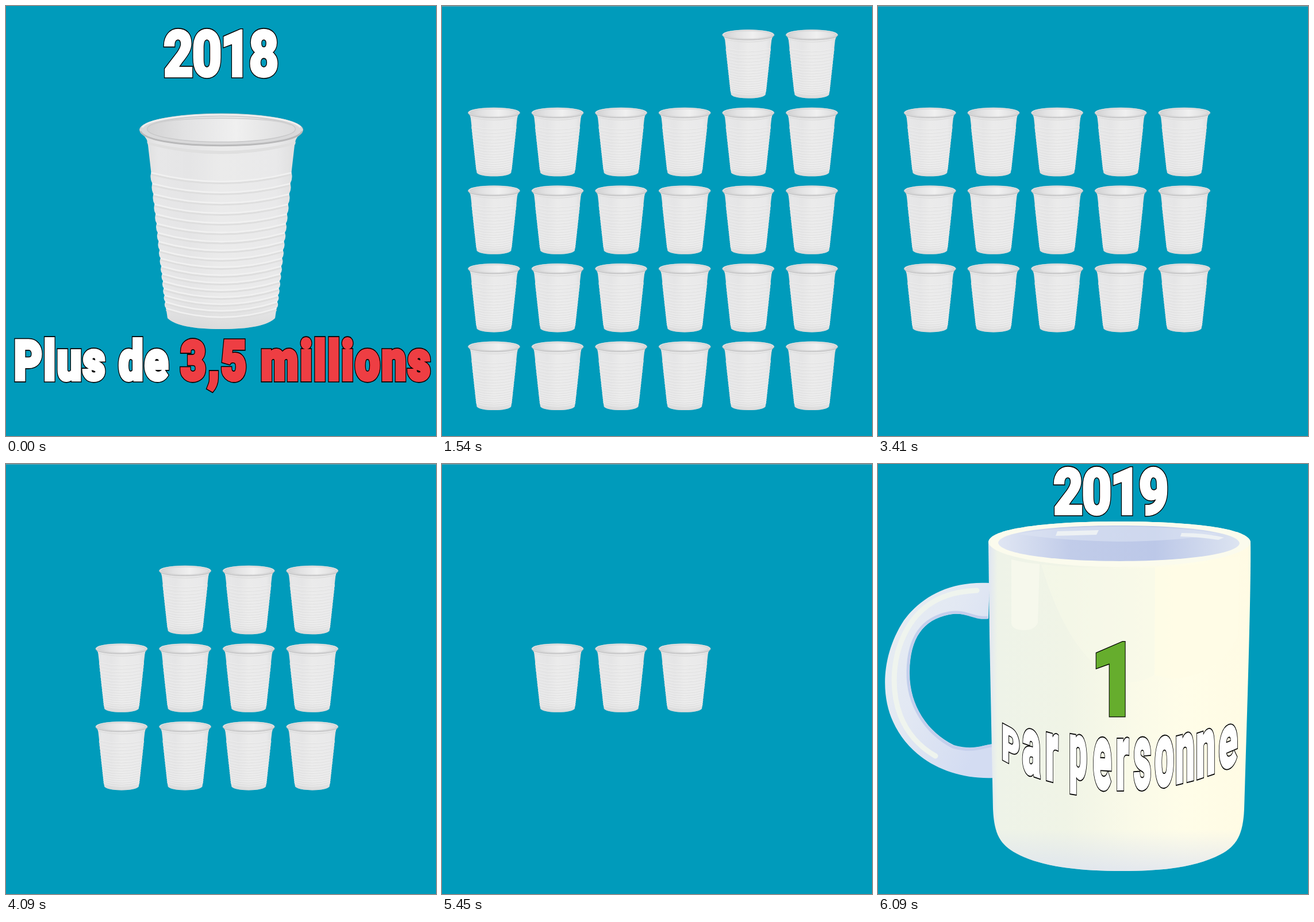
Write an HTML page that moves like this. It is 748 px wide and 748 px high and loops after 8000 ms.

```html
<!DOCTYPE html>
<html lang="fr">
<head>
<meta charset="utf-8">
<title>Gobelets</title>
<style>
  html, body { margin: 0; width: 100%; height: 100%; overflow: hidden; background: #009bbb; }
  svg { display: block; width: 100vw; height: 100vh; }
  text {
    font-family: Roboto, "Open Sans", sans-serif;
    font-weight: 900;
    stroke-linejoin: miter;
    stroke-miterlimit: 2;
    paint-order: stroke;
    vector-effect: non-scaling-stroke;
  }
  #grid, #mug { visibility: hidden; }
</style>
</head>
<body>
<svg viewBox="0 0 748 748">
  <defs>
    <linearGradient id="cupSide">
      <stop offset="0" stop-color="#dedede"/>
      <stop offset=".1" stop-color="#e7e7e8"/>
      <stop offset=".3" stop-color="#e5e5e6"/>
      <stop offset=".5" stop-color="#ebebeb"/>
      <stop offset=".85" stop-color="#e9e9ea"/>
      <stop offset="1" stop-color="#dddddd"/>
    </linearGradient>
    <linearGradient id="cupInside">
      <stop offset="0" stop-color="#d3d3d4"/>
      <stop offset=".25" stop-color="#e2e2e3"/>
      <stop offset=".6" stop-color="#f0f0f0"/>
      <stop offset="1" stop-color="#dcdcdd"/>
    </linearGradient>
    <linearGradient id="cupFoot" x2="0" y2="1">
      <stop offset=".85" stop-color="#ccc" stop-opacity="0"/>
      <stop offset="1" stop-color="#ccc" stop-opacity=".5"/>
    </linearGradient>
    <linearGradient id="mugSide">
      <stop offset="0" stop-color="#dfe5f2"/>
      <stop offset=".035" stop-color="#eef3e8"/>
      <stop offset=".3" stop-color="#f0f4e6"/>
      <stop offset=".55" stop-color="#fafae8"/>
      <stop offset=".75" stop-color="#fffde8"/>
      <stop offset="1" stop-color="#fffbe4"/>
    </linearGradient>
    <linearGradient id="mugFoot" x2="0" y2="1">
      <stop offset=".88" stop-color="#d5dcf2" stop-opacity="0"/>
      <stop offset="1" stop-color="#d5dcf2" stop-opacity=".6"/>
    </linearGradient>
    <linearGradient id="mugInside">
      <stop offset="0" stop-color="#e0e6f3"/>
      <stop offset=".3" stop-color="#c1cce9"/>
      <stop offset=".65" stop-color="#bcc8e8"/>
      <stop offset="1" stop-color="#dde4f1"/>
    </linearGradient>
    <linearGradient id="handleTone" x2=".9" y2=".8">
      <stop offset="0" stop-color="#e8eef2"/>
      <stop offset=".5" stop-color="#e2e8f3"/>
      <stop offset="1" stop-color="#d3dcf2"/>
    </linearGradient>
    <g id="cup">
      <path class="side" fill="url(#cupSide)"/>
      <path class="side" fill="url(#cupFoot)"/>
      <path class="dark" fill="none" stroke="#dedede" stroke-width="3"/>
      <path class="light" fill="none" stroke="#f1f1f1" stroke-width="2.6"/>
      <path d="M245 236Q374 268 504 236L503 241Q374 274 247 241Z" fill="#dfdfdf"/>
      <ellipse cx="374.5" cy="215.2" rx="142" ry="28" fill="#d9d9da" stroke="#c9c9ca"/>
      <path d="M234 218C248 251 501 251 515 218" fill="none" stroke="#b9b9ba" stroke-width="3"/>
      <path d="M237 211C258 182 491 182 512 211" fill="none" stroke="#eee" stroke-width="3"/>
      <ellipse cx="374.5" cy="214" rx="129" ry="22.5" fill="url(#cupInside)" stroke="#c8c8c9" stroke-width="1.5"/>
      <path d="M254 207C282 191 467 191 495 207" fill="none" stroke="#d0d0d1" stroke-width="2"/>
    </g>
    <path id="mugBody" d="M192 136C193 111 300 100 420 100C540 100 646 111 648 136C649 190 645 330 643 400L637 600C635 645 624 664 596 679C552 702 495 708 425 708C345 708 282 700 240 677C213 662 202 645 200 600L194 300Z"/>
  </defs>

  <rect width="748" height="748" fill="#009bbb"/>

  <g id="intro"><use href="#cup"/></g>

  <g id="grid"><rect width="748" height="1" fill="#6fa3ae"/></g>

  <g id="mug">
    <path fill="url(#handleTone)" d="M194 207C120 203 72 235 45 272C4 335 6 405 26 448C55 512 122 549 201 546L200 487C184 488 167 499 132 489C86 466 54 420 55 361C56 303 78 271 124 262C152 257 165 270 192 269Z"/>
    <path fill="none" stroke="#eff4ee" stroke-width="9" stroke-linecap="round" d="M172 220C108 222 74 250 55 280C22 332 23 396 39 438C52 471 74 493 100 508"/>
    <path fill="none" stroke="#c4cfec" stroke-width="5" d="M198 490C180 492 166 502 130 492C84 468 51 420 52 361C53 301 77 268 124 259C154 254 166 270 191 267"/>
    <use href="#mugBody" fill="url(#mugSide)"/>
    <use href="#mugBody" fill="url(#mugFoot)"/>
    <path fill="#f8faee" opacity=".75" d="M232 166Q255 172 281 174L278 276Q272 290 252 289Q234 288 232 278Z"/>
    <path fill="#f8f9e9" opacity=".55" d="M284 175Q380 184 482 180L480 368Q440 390 410 372Q330 330 284 175Z"/>
    <path fill="#fffde6" opacity=".8" d="M482 180Q570 176 629 160L626 300Q590 370 510 374L482 367Z"/>
    <path fill="#fbfbed" d="M192 136C193 111 300 100 420 100C540 100 646 111 648 136C646 160 540 179 420 179C300 179 195 160 192 136Z"/>
    <path fill="url(#mugInside)" d="M209 137C212 117 310 107 420 107C530 107 626 118 629 138C626 157 530 169 420 169C310 169 212 157 209 137Z"/>
    <path fill="#dfe6f5" opacity=".55" d="M245 122C330 104 510 104 592 122Q510 135 420 135Q325 134 245 122Z"/>
    <path fill="#edf1f4" d="M312 117L384 115L380 123L309 125ZM528 120Q570 120 602 128L592 132Q560 127 526 126Z"/>
  </g>
</svg>

<script>
const LOOP = 8000, GRID_START = 500, FIRST_REMOVAL = 1030, STEP = 170, MUG_START = 6090;
const COLS = 6, ROWS = 5;
const SVG = 'http://www.w3.org/2000/svg';
const [intro, grid, mug] = ['intro', 'grid', 'mug'].map(id => document.getElementById(id));

function add(parent, tag, attrs, content = '') {
  const node = document.createElementNS(SVG, tag);
  for (const key in attrs) node.setAttribute(key, attrs[key]);
  node.textContent = content;
  return parent.appendChild(node);
}

// Outlined lettering: a black layer below a coloured one, both thickened by `fat`.
function letter(parent, content, matrix, { size = 100, fill = '#fff', fat = 2, line = 1.4, anchor = 'middle', spacing = 0 }) {
  for (const [color, width] of [['#000', 2 * (fat + line)], [fill, 2 * fat]]) {
    add(parent, 'text', {
      transform: `matrix(${matrix})`, 'font-size': size, 'text-anchor': anchor,
      'letter-spacing': spacing, fill: color, stroke: color, 'stroke-width': width
    }, content);
  }
}

const condensed = (x, y) => [.8, 0, 0, 1, x, y];

function shapeCup() {
  const left = y => 247 + (y - 240) * .11;
  const right = y => 749 - left(y);
  const ridges = [290];
  for (let step = 19; ridges.at(-1) < 525; step *= .965) ridges.push(ridges.at(-1) + step);

  const bumps = (ys, edge, bulge) => ys.slice(1).map((y, i) => {
    const mid = (y + ys[i]) / 2;
    return `Q${edge(mid) + bulge} ${mid} ${edge(y)} ${y}`;
  }).join('');
  const upward = [...ridges].reverse();
  const side = `M238 224Q246 230 247 242L${left(290)} 290${bumps(ridges, left, -4)}`
    + `L281 543Q300 562 374.5 562Q449 562 468 543L${right(upward[0])} ${upward[0]}`
    + `${bumps(upward, right, 4)}L502 242Q503 230 511 224Z`;
  const rings = shift => ridges.map(y =>
    `M${left(y)} ${y + shift}Q374.5 ${y + shift + 31} ${right(y)} ${y + shift}`).join('');

  document.querySelectorAll('.side').forEach(path => path.setAttribute('d', side));
  document.querySelector('.dark').setAttribute('d', rings(3));
  document.querySelector('.light').setAttribute('d', rings(0));
}

// Clockwise inward spiral from the top left corner.
function spiral() {
  const order = [], seen = new Set();
  let col = 0, row = 0, dx = 1, dy = 0;
  const free = (c, r) => c >= 0 && c < COLS && r >= 0 && r < ROWS && !seen.has(r * COLS + c);
  while (order.length < COLS * ROWS) {
    order.push([col, row]);
    seen.add(row * COLS + col);
    if (!free(col + dx, row + dy)) [dx, dy] = [-dy, dx];
    col += dx;
    row += dy;
  }
  return order;
}

// Letters follow a bowl-shaped baseline and grow towards the middle.
function curvedCaption() {
  const centers = [231, 267, 302, 348, 390, 425, 460, 498, 534, 570, 609];
  const adjust = { P: [.64, 6], p: [.86, 14] };
  [...'Parpersonne'].forEach((char, i) => {
    const x = centers[i], u = (x - 421) / 205;
    const [fit, lift] = adjust[char] || [1, 0];
    const base = 566 - 46 * u * u - lift;
    const tall = (88 - 20 * u * u) / 54 * fit;
    letter(mug, char, [.6 * Math.sqrt(fit), -.28 * u, 0, tall, x, base], { fat: 1.5 });
  });
}

shapeCup();
letter(intro, '2018', condensed(373, 122), { size: 112, spacing: -3 });
letter(intro, 'Plus de', condensed(14, 650), { size: 94, fat: 2.8, anchor: 'start', spacing: 3.2 });
letter(intro, '3,5 millions', condensed(304, 650), { size: 94, fat: 2.8, fill: '#ee3e43', anchor: 'start', spacing: 4.2 });
letter(mug, '2019', condensed(404, 87), { size: 112, spacing: -3 });
letter(mug, '1', condensed(411, 437), { size: 177, fill: '#66ad2d', line: 1.2 });
curvedCaption();

const cups = spiral().map(([col, row]) => add(grid, 'use', {
  href: '#cup',
  transform: `translate(${-28.9 + col * 110.6} ${-18.4 + row * 135.6}) scale(.3185)`
}));

const show = (node, on) => { node.style.visibility = on ? 'visible' : 'hidden'; };
let start;

function frame(now) {
  start ??= now;
  const t = (now - start) % LOOP;
  const inGrid = t >= GRID_START && t < MUG_START;
  show(intro, t < GRID_START);
  show(grid, inGrid);
  show(mug, t >= MUG_START);
  cups.forEach((cup, i) => show(cup, inGrid && t < FIRST_REMOVAL + i * STEP));
  requestAnimationFrame(frame);
}
requestAnimationFrame(frame);
</script>
</body>
</html>
```
